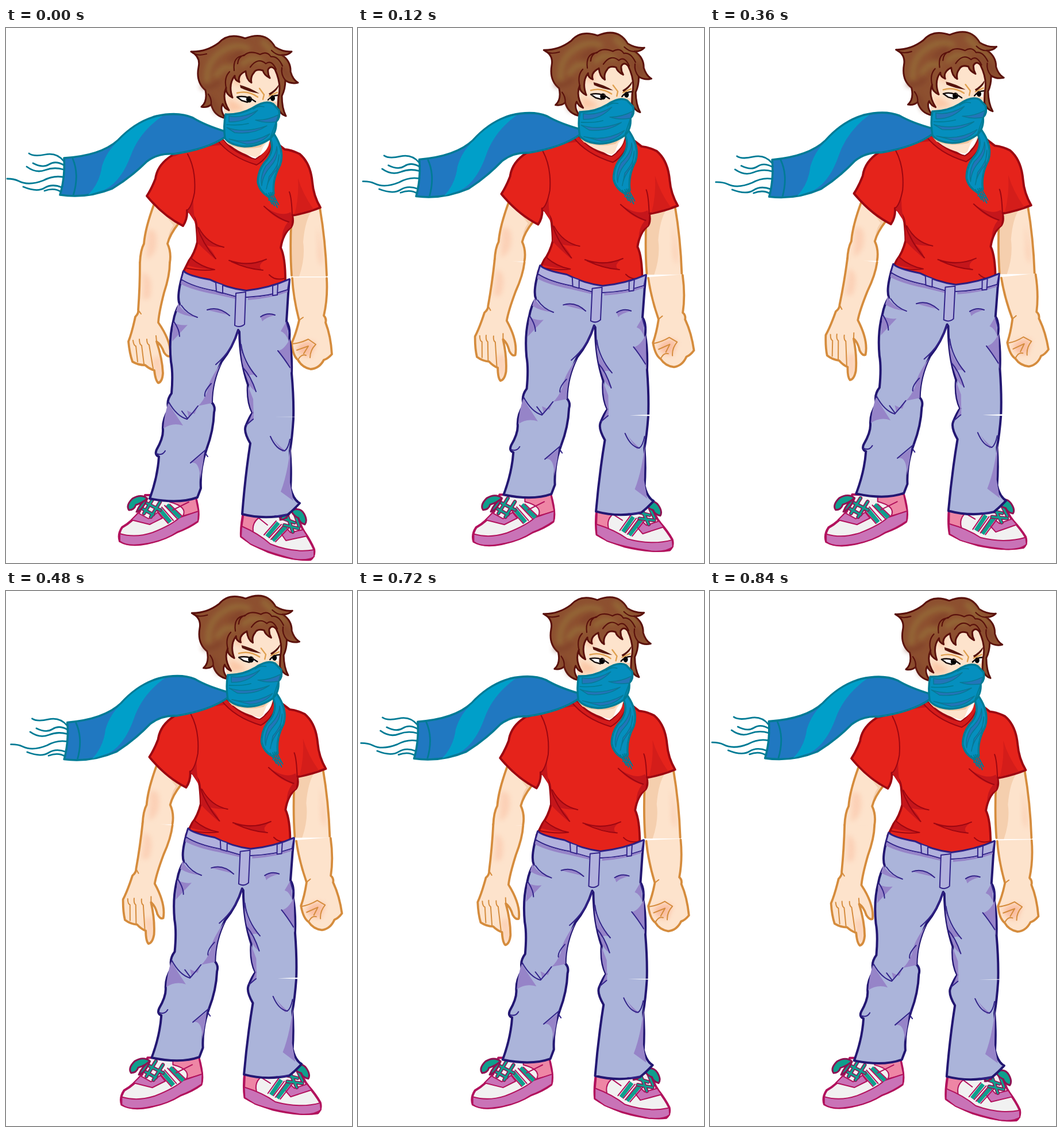
An HTML page for the animation above (0.96 s loop, 602 by 930 pixels).

```html
<!DOCTYPE html>
<html lang="en">
<head>
<meta charset="utf-8">
<title>Standing figure with scarf</title>
<style>
html, body { margin: 0; width: 100%; height: 100%; overflow: hidden; background: #fff; }
svg { display: block; width: 100%; height: 100%; }
path { fill: none; stroke-width: 2; stroke-linecap: round; stroke-linejoin: round; }
.arm path { stroke: #d58c3d; }
.arm .skin { fill: #fde3cc; stroke: none; }
.arm .side { stroke-width: 3.8; }
.arm .tone { fill: #f5cfae; stroke: none; }
.arm .blush { fill: #f9b596; stroke: none; opacity: .4; filter: url(#soft); }
#shirt path { stroke: #9c0711; }
#shirt .base { fill: #e5231b; stroke-width: 3.8; }
#shirt .tone { fill: #c5161b; stroke: none; }
#shirt .faint { fill: #d41d1a; stroke: none; }
#shirt .collar { fill: #d51c1b; }
#pants path { stroke: #33248a; }
#pants .base { fill: #abb4da; stroke: #231772; stroke-width: 4; }
#pants .tone { fill: #9684c8; stroke: none; }
#pants .belt { fill: #b1b1dd; }
.shoe path { stroke: #b2125d; }
.shoe .base { fill: #f1f1f1; stroke-width: 4; }
.shoe .sole { fill: #c973b7; }
.shoe .heel { fill: #ee86a5; }
.shoe .band { stroke: #0f9f8d; stroke-width: 7; stroke-linecap: butt; }
.shoe .lace { stroke: #0f9f8d; stroke-width: 3.4; }
.shoe .edge { stroke: #8e1253; stroke-width: 6.4; }
.shoe .bow { fill: #0f9f8d; stroke: #8e1253; stroke-width: 3; }
#head .skin { fill: #fde3cc; }
#head .shade { fill: #efc5a0; }
#head .blush { fill: #f9ae83; opacity: .5; filter: url(#soft); }
#head .white { fill: #fff; }
#head .hair { fill: #8d5030; stroke: #5a110c; stroke-width: 3; }
#head .strand { stroke: #5a110c; stroke-width: 2.2; }
#head .glow { stroke: #98753b; stroke-width: 10; opacity: .65; filter: url(#soft); }
#head .dusk { stroke: #7c3a28; stroke-width: 8; opacity: .6; filter: url(#soft); }
#head .brow { fill: #54140d; }
#head .lid { stroke: #e0a150; stroke-width: 2.4; }
#head .lash { stroke: #150c0c; stroke-width: 2.4; }
#head .cloth { fill: #2078c1; stroke: #007b95; stroke-width: 3.6; }
#head .wrap { fill: #058fbe; stroke: #007b95; stroke-width: 3.4; }
#head .stripe { fill: #009fc9; }
#head .fold { fill: #2375b9; stroke: #077996; stroke-width: 1.5; }
#head .line, #head .fringe { stroke: #007b95; stroke-width: 2.8; }
</style>
</head>
<body>
<svg viewBox="0 0 602 930" preserveAspectRatio="none">
<filter id="soft" x="-50%" y="-50%" width="200%" height="200%"><feGaussianBlur stdDeviation="4"/></filter>

<g id="leftUpper" class="arm">
  <path class="skin" d="M258 305Q242 348 240 375Q234 386 233 409L285 409Q287 390 281 375Q284 360 302 335Z"/>
  <path class="tone" d="M275 322L302 335Q284 358 281 378Q281 356 291 343Z"/>
  <path class="blush" d="M246 352Q262 345 262 370T244 402Z"/>
  <path class="side" d="M258 305Q242 348 240 375Q234 386 233 408M300 340Q285 359 281 375Q288 390 285 408"/>
</g>
<g id="leftFore" class="arm">
  <path class="skin" d="M233 408Q233 450 230 490Q231 496 225 502Q219 530 213 545Q215 566 220 580Q230 586 242 586Q250 593 258 595Q260 613 265 617Q272 615 273 600Q272 575 262 545Q270 550 275 564Q281 573 286 570Q288 545 265 512Q266 495 275 460Q285 430 285 408Z"/>
  <path class="blush" d="M238 425Q258 430 250 470L238 472ZM254 575L268 570L272 605L264 614Z"/>
  <path class="side" d="M233 408Q233 450 230 490Q231 496 225 502Q219 530 213 545Q215 566 220 580Q230 586 242 586Q250 593 258 595Q260 613 265 617Q272 615 273 600Q272 575 262 545Q270 550 275 564Q281 573 286 570Q288 545 265 512Q266 495 275 460Q285 430 285 408"/>
  <path d="M221 543Q222 552 226 553L229 580M232 541Q232 550 236 552L240 584M245 541Q245 549 249 551L256 592M230 490L235 497M262 545L261 535"/>
</g>

<g id="rightUpper" class="arm">
  <path class="skin" d="M495 322L547 306Q556 370 558 432H497Q494 390 495 322Z"/>
  <path class="tone" d="M495 322L532 318Q520 335 517 372Q521 400 510 432H497Q494 390 495 322Z"/>
  <path class="blush" d="M541 345Q553 385 550 415Q541 405 543 380Z"/>
  <path class="side" d="M496 340Q494 390 497 430M546 312Q556 370 558 430"/>
</g>
<g id="rightFore" class="arm">
  <path class="skin" d="M498 433.5H558Q560 470 553 500Q558 505 556 512Q565 535 567 567Q560 575 553 577Q545 592 530 593Q515 590 508 577Q499 570 497 548Q505 530 510 508Q500 470 498 433.5Z"/>
  <path class="blush" style="opacity:.8" d="M505 555Q522 538 539 549L529 572L512 568Z"/>
  <path class="side" d="M498 435Q500 470 510 508Q505 530 497 548Q499 570 508 577Q515 590 530 593Q545 592 553 577Q560 575 567 567Q565 535 556 512Q558 505 553 500Q560 470 558 435"/>
  <path d="M498 549Q512 548 526 541L539 550Q529 560 529 573M506 560L526 553L518 566M508 577Q514 566 522 569M510 508L517 503"/>
</g>

<g id="shirt">
  <path class="base" d="M370 195Q315 212 288 222Q263 238 260 262Q253 280 245 292Q274 327 308 344Q316 332 315 317Q329 326 331 341Q333 360 333 372Q328 392 318 405L308 425V438L400 462L486 450Q487 400 478 382Q482 357 496 346Q501 338 498 326Q525 321 547 312Q535 292 533 268Q530 235 511 219Q497 212 485 211L463 194L436 232Z"/>
  <path class="faint" d="M508 261Q516 288 535 315L502 324Q510 295 508 261Z"/>
  <path class="tone" d="M288 222Q325 207 370 197L377 203Q325 208 294 223ZM332 344Q345 372 379 381Q360 381 349 378Q365 393 364 402Q345 386 333 373ZM322 400Q335 410 359 419Q345 420 316 413ZM388 403Q424 414 453 402Q435 413 446 421Q416 416 388 403ZM498 326L496 346Q483 354 480 368Q480 350 490 338Q465 330 449 310Q478 330 495 320ZM315 317Q324 306 326 296Q325 322 331 341Z"/>
  <path d="M316 219Q331 247 328 286Q323 312 315 317M332 344Q342 375 365 401M335 347Q350 375 379 381M322 400Q340 416 363 420Q340 423 312 417M388 404Q420 416 453 402M392 406Q420 419 447 421M498 326Q497 295 493 285M449 310Q472 331 492 337M486 435Q468 440 458 429"/>
  <path class="collar" d="M368 195L378 194Q398 220 434 228Q452 217 458 194L465 198Q457 226 436 238Q390 224 368 195Z"/>
</g>

<g id="leftShoe" class="shoe">
  <path class="base" d="M242 812L233 840Q220 858 202 868Q194 880 198 892Q215 902 245 896Q275 890 298 876Q320 868 333 858Q338 844 329 812Z"/>
  <path class="heel" d="M285 812H329L335 841L308 848Q316 832 285 824Z"/>
  <path class="sole" d="M198 879Q225 887 255 877Q288 864 302 851Q325 843 335 840L334 857Q315 870 298 876Q275 892 240 897Q210 902 198 892Z"/>
  <path class="sole" d="M230 843L218 855L250 863L272 852L264 842L248 853Z"/>
  <path class="band" d="M267 836L286 859M280 829L303 851"/>
  <path d="M262 838L282 861M271 833L291 856M276 830L298 853M285 828L307 849M318 824L290 838"/>
  <path class="edge" d="M238 836L256 846M241 824L268 838M256 818L240 844M268 824L252 850"/>
  <path class="lace" d="M238 836L256 846M241 824L268 838M256 818L240 844M268 824L252 850"/>
  <path class="bow" d="M246 818Q235 809 220 818Q208 830 214 838Q223 838 226 829Q236 826 246 818ZM246 818Q233 826 227 841Q238 838 246 818Z"/>
</g>
<g id="rightShoe" class="shoe">
  <path class="base" d="M414 838Q408 865 409 884Q425 897 455 910Q500 926 530 924Q538 918 536 906Q530 892 519 876Q510 862 505 836Z"/>
  <path class="heel" d="M414 842L446 848Q425 858 431 880L410 869Z"/>
  <path class="sole" d="M410 866Q440 879 460 897Q500 913 536 907V919Q525 927 500 923Q450 910 425 897L409 884Z"/>
  <path class="sole" d="M476 875L487 891L524 883L517 872L495 877L485 866Z"/>
  <path class="band" d="M474 860L454 884M489 864L464 891"/>
  <path d="M470 857L449 881M479 863L458 886M485 862L461 889M494 867L469 893M440 852L455 864"/>
  <path class="edge" d="M478 851L502 860M484 864L509 870M489 846L499 876M503 846L510 866"/>
  <path class="lace" d="M478 851L502 860M484 864L509 870M489 846L499 876M503 846L510 866"/>
  <path class="bow" d="M496 839Q512 832 519 845Q525 857 520 863Q511 860 509 852Q501 849 496 839ZM496 839Q480 843 477 855Q490 854 496 839Z"/>
</g>

<g id="pants">
  <path class="base" d="M309 423Q316 431 355 438Q385 453 418 457Q460 452 493 437L491 462L488 510Q495 520 493 540Q498 565 497 600Q501 645 500 680Q498 712 494 735Q497 768 495 800Q500 820 511 826Q500 838 490 846Q450 855 411 845Q416 780 425 722Q413 702 417 692Q424 675 429 669Q419 650 421 620Q407 580 406 528L404 525Q395 555 375 580Q358 615 358 651Q365 658 362 668Q361 700 349 732Q337 765 339 800L333 816Q300 828 250 818Q264 780 266 745Q258 742 262 733Q274 712 273 698Q272 680 283 663Q278 648 288 635Q291 600 287 580Q283 540 291 510Q294 492 302 480Q296 465 309 423Z"/>
  <path class="tone" d="M291 512Q304 518 316 516L289 545ZM300 478Q306 494 331 503Q308 500 296 492ZM374 583Q352 613 350 632Q343 650 334 657L358 652Q358 615 374 583ZM282 652Q295 672 308 691Q290 685 274 696Q275 675 282 652ZM345 738Q330 750 322 756Q337 752 338 785L343 755ZM408 548Q410 583 436 605Q428 600 421 605Q433 621 435 632Q424 625 421 615Q408 582 408 548ZM421 622L430 645L431 680L419 691L429 669Q420 650 421 622ZM494 540Q484 560 473 561L492 585L496 600ZM488 510L478 527Q487 530 492 545ZM495 727Q490 775 478 806L500 822L494 790ZM350 490Q370 484 388 499Q365 494 350 490ZM443 502Q460 494 468 499Q450 504 446 510ZM315 665L328 671L334 657L318 677ZM463 712Q478 730 487 735L481 737Z"/>
  <path class="belt" d="M309 423Q316 431 355 438Q385 453 418 457Q460 452 493 437L490 455Q460 466 419 468L400 467L364 457Q325 450 305 437Z"/>
  <path class="tone" d="M305 439Q325 451 364 458L400 468V471L364 463Q325 456 304 445ZM421 469Q460 467 490 456V459Q460 470 421 473Z"/>
  <path class="belt" d="M400 461L417 459L415 515Q407 522 398 517ZM365 442L377 446V461L366 458ZM464 448L473 445L472 464L464 465Z"/>
  <path d="M305 482Q315 497 333 503M292 510Q302 525 302 536M350 490Q370 483 389 500M443 502Q455 494 468 499M404 526Q394 560 365 585M409 550Q413 580 436 606M412 590Q426 605 435 632M494 590Q483 573 473 561M357 618Q344 632 346 640M283 650Q297 675 315 680Q326 668 334 657M306 666L316 679M262 740Q272 744 277 735M349 732L321 756M346 738L351 745M460 710Q470 733 485 735Q491 731 494 715M430 680L418 690M488 512L493 530M488 846Q478 849 468 848"/>
</g>
<path id="kneeGap" style="fill:#fff" d="M466 676L502 675.8V676.2Z"/>

<g id="head">
  <path class="skin" d="M378 105L400 70L465 62L478 95L473 150L458 200Q455 215 436 225Q400 217 381 194Z"/>
  <path class="white" d="M448 206L458 194Q455 214 441 222Z"/>
  <path class="shade" d="M382 196Q410 212 450 200L443 207Q415 213 388 203Z"/>
  <path class="blush" d="M385 122Q410 132 415 142L388 146ZM452 118L474 130V140ZM392 92L412 80L406 102Z"/>
  <path class="white" d="M404 121Q420 115 434 126Q420 132 409 126ZM457 125Q464 116 473 119L470 128Z"/>
  <ellipse cx="423" cy="124" rx="5" ry="5.5"/><ellipse cx="464" cy="122" rx="4" ry="5"/>
  <circle cx="425" cy="122" r="1.2" fill="#fff"/>
  <path class="lid" d="M402 113Q421 108 438 120M458 118L472 112M441 105L449 116L447 124"/>
  <path class="lash" d="M402 120Q418 116 434 128M402 120L410 126L420 129M456 125Q463 117 473 117"/>
  <path class="brow" d="M407 99Q423 103 441 114Q422 111 408 104ZM457 114Q467 109 474 99Q475 107 459 117Z"/>
  <path class="hair" d="M322 41Q348 42 370 26Q387 7 416 18Q452 4 468 33Q482 42 497 41Q490 48 480 47Q496 58 495 76Q499 90 508 95Q496 98 486 91Q486 106 480 118Q480 140 487 153Q477 150 473 138L474 120Q480 98 468 72Q461 64 456 72Q455 80 459 87Q449 82 447 74Q435 70 431 78Q425 85 427 95Q418 90 417 75Q402 82 406 94Q397 90 398 83Q386 98 394 121Q381 114 383 104Q375 122 388 143Q380 140 377 132Q371 142 382 157Q362 153 357 133Q350 139 340 137Q351 128 347 108Q330 94 335 68Q339 50 322 41Z"/>
  <path class="glow" d="M350 92Q348 60 372 43Q396 25 420 35M448 25Q462 40 480 60M366 83Q376 64 395 69M412 62Q426 49 443 57"/>
  <path class="dusk" d="M342 102Q360 105 370 94M355 122Q363 130 367 145M390 55Q402 46 410 44M466 53Q483 70 491 84"/>
  <path class="strand" d="M322 41Q331 50 349 45M397 74Q394 49 414 48Q424 38 442 46Q454 39 461 50Q473 48 481 66M414 47Q404 50 403 62M425 68Q438 50 452 62Q462 54 470 72M383 104Q379 86 389 76M480 47Q471 48 462 39M486 91Q478 81 480 69M357 133Q358 123 352 115"/>

  <path class="cloth" d="M382 180Q346 169 325 156Q300 145 262 153Q225 163 195 195Q165 222 101 226Q103 260 94 290Q140 297 185 279Q218 259 245 232Q265 217 291 219Q350 211 382 189Z"/>
  <path class="stripe" d="M197 195Q230 160 272 153Q232 181 217 222Q200 267 172 281L143 290Q163 270 167 240Q176 212 197 195Z"/>
  <path class="line" d="M116 227Q128 255 117 291"/>
  <path class="fringe" d="M100 231Q88 216 68 220T40 218M100 238Q86 230 75 237T47 235M100 246Q84 241 68 247T36 241M99 259Q82 256 65 265Q39 275 22 266Q14 262 2 262M97 277Q80 270 67 278T30 276M96 285Q84 277 67 283"/>

  <path class="wrap" d="M459 190Q468 210 455 228Q438 245 438 268Q441 284 456 293L466 288Q463 263 477 238Q486 212 464 181Z"/>
  <path class="fold" d="M471 206Q470 224 452 240Q442 257 445 274Q447 255 460 241Q475 225 471 206ZM475 220Q476 238 458 258L453 280Q456 262 471 246Z"/>
  <path class="line" style="stroke-width:2" d="M453 288L463 306M457 287L467 309M460 286L472 312M463 286L474 307M455 293L469 298M457 299L472 303"/>
  <path class="wrap" d="M382 150Q408 151 429 139Q452 124 465 132L475 143Q478 156 470 163Q471 181 460 192Q440 206 415 206Q391 204 381 192Q378 170 382 150Z"/>
  <path class="fold" d="M388 153Q411 158 438 143Q417 165 388 163ZM384 173Q414 184 454 170Q430 186 398 182ZM470 163Q451 166 434 160Q454 161 474 151ZM388 193Q425 203 459 184Q445 201 419 202Z"/>
  <path class="line" style="stroke-width:1.6" d="M384 168Q405 170 422 166M430 141Q439 134 449 137M470 163L460 190"/>
</g>
</svg>
<script>
const STEP = 120, STEPS = 8;

// Full displacement of each part: pivot, shift, turn in degrees, growth per axis.
const moves = {
  leftUpper:  { pivot: [258, 312], shift: [7, -5] },
  leftFore:   { pivot: [265, 408], shift: [7, -4], turn: 9 },
  rightUpper: { pivot: [525, 320], shift: [8, -5] },
  rightFore:  { pivot: [558, 433], shift: [10, -8], turn: -7 },
  shirt:      { pivot: [400, 200], shift: [10.5, -8], grow: [.025, .03] },
  leftShoe:   { pivot: [197, 885], shift: [5, 1], grow: [.035, .03] },
  rightShoe:  { pivot: [408, 880], shift: [9, -5], turn: -9, grow: [.03, 0] },
  pants:      { pivot: [400, 425], shift: [12, -13], turn: 1, grow: [0, .014] },
  kneeGap:    { pivot: [500, 676], shift: [10, -4], grow: [0, 8] },
  head:       { pivot: [322, 41], shift: [2, -4], turn: -2 }
};

function pose(amount) {
  for (const [id, { pivot: [px, py], shift: [dx, dy], turn = 0, grow: [gx, gy] = [0, 0] }] of Object.entries(moves)) {
    document.getElementById(id).setAttribute('transform',
      `translate(${px + dx * amount} ${py + dy * amount}) rotate(${turn * amount}) ` +
      `scale(${1 + gx * amount} ${1 + gy * amount}) translate(${-px} ${-py})`);
  }
}

// Quick breath in over two steps, then an even release over six.
function draw(now) {
  const step = Math.floor(now / STEP) % STEPS;
  pose(Math.min(step * 2 / 3, (STEPS - step) / 6));
  requestAnimationFrame(draw);
}
draw(performance.now());
</script>
</body>
</html>
```
